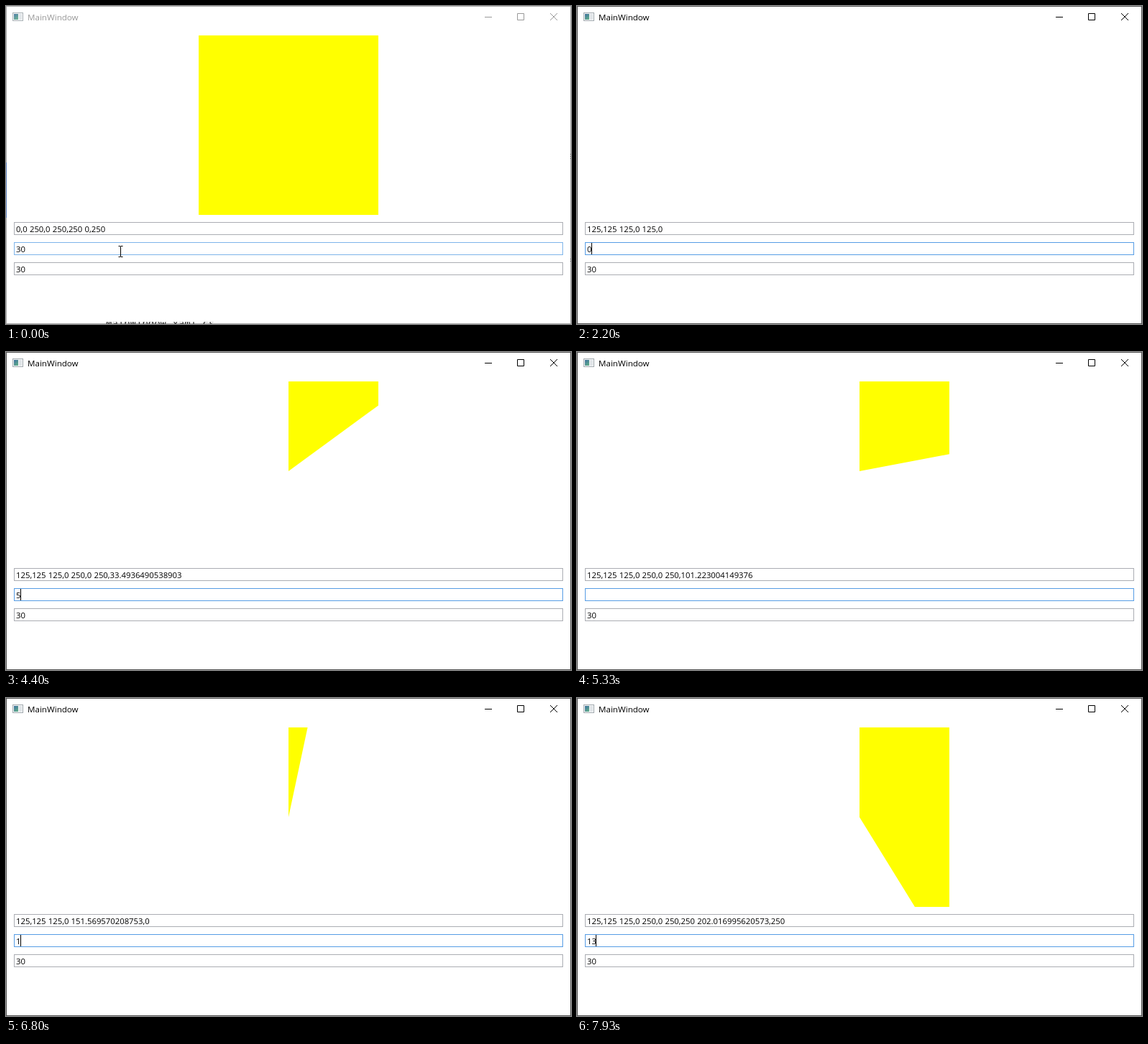
Write an HTML page that moves like this. It is 786 px wide and 443 px high and loops after 8 s.

```html
<!DOCTYPE html>
<html lang="en">
<head>
<meta charset="utf-8">
<title>MainWindow</title>
<style>
  html, body { margin: 0; width: 100%; height: 100%; overflow: hidden; background: #fff; }
  svg { display: block; width: 786px; height: 443px; }
  text { font-family: "Open Sans", "Noto Sans", sans-serif; font-size: 11.3px; word-spacing: .3px; white-space: pre; }
  .line { fill: none; stroke-width: 1; }
</style>
</head>
<body>
<svg viewBox="0 0 786 443" xmlns="http://www.w3.org/2000/svg">
  <defs>
    <linearGradient id="pane" x2="0.6" y2="1">
      <stop offset="0" stop-color="#3d6f9e"/>
      <stop offset="1" stop-color="#5fa98c"/>
    </linearGradient>
    <clipPath id="bottomEdge"><rect x="130" y="440" width="180" height="3"/></clipPath>
  </defs>
  <rect width="786" height="443" fill="#fff"/>

  <g id="icon">
    <rect x="9.5" y="9.5" width="14" height="11" fill="#f4f6f7" stroke="#a3abb0"/>
    <rect x="11" y="11" width="6" height="8" fill="url(#pane)"/>
    <rect x="18" y="11" width="4" height="8" fill="#dfe4e7"/>
  </g>
  <text id="title" x="30" y="20" style="font-size:11.6px">MainWindow</text>
  <path id="buttons" class="line" d="M666 15.5h10M711.5 10.5h9v9h-9zM757 10l10 10M767 10l-10 10"/>

  <polygon id="shape" transform="translate(268 41)" fill="#ff0"/>

  <g class="line" stroke="#abadb3">
    <rect x="11.5" y="301.5" width="763" height="17"/>
    <rect id="field" x="11.5" y="329.5" width="763" height="17"/>
    <rect x="11.5" y="357.5" width="763" height="17"/>
  </g>
  <text id="points" x="14" y="315"></text>
  <text id="value" x="14" y="343"></text>
  <text x="14" y="371">30</text>
  <rect id="selection" y="330" height="16" fill="#0078d7" fill-opacity=".42"/>
  <rect id="caret" y="330" width="1" height="16"/>

  <rect id="frame" class="line" x=".5" y=".5" width="785" height="442"/>
  <g id="behind">
    <path class="line" stroke="#5f82c0" d="M.5 218v77"/>
    <path class="line" stroke="#555" stroke-dasharray="1 2" d="M785.5 206v7M785.5 352v6"/>
    <text x="139" y="447" clip-path="url(#bottomEdge)" fill="#333"
      style="font:14px 'Noto Sans Mono',monospace">MainWindow.xaml.cs</text>
  </g>
  <path id="mouse" class="line" stroke="#000" d="M-3 -7.5h2.5l.5 .5l.5 -.5h2.5M0 -7v14M-3 7.5h2.5l.5 -.5l.5 .5h2.5"/>
</svg>
<script>
const LOOP = 8000, HALF = 125, MAX = 30, DIGIT = 6.47;
const ACTIVATE = 70, TICK = 66.4, DRAG_TICKS = 11;

// time, typed text, and whether the caret shows up a moment late
const edits = [
  [0, '30'], [2200, '0'],
  [2800, '', 1], [2930, '1'], [3330, '', 1], [3400, '2'],
  [3670, '', 1], [3730, '3'], [4000, '', 1], [4070, '4'],
  [4330, '', 1], [4400, '5'], [4670, ''], [4800, '6'],
  [5000, '', 1], [5130, '7'], [5330, '', 1], [5470, '8'],
  [5670, '', 1], [5730, '9'], [6070, '', 1],
  [6330, '1'], [6470, '10'], [6800, '1'], [7070, '11', 1],
  [7330, '1'], [7530, '12'], [7730, '1'], [7870, '13', 1]
];

const el = {};
document.querySelectorAll('svg [id]').forEach(n => el[n.id] = n);
const set = (name, attrs) => {
  for (const key in attrs) el[name].setAttribute(key, attrs[key]);
};
const show = (name, on) => set(name, { visibility: on ? 'visible' : 'hidden' });
const num = x => String(+x.toPrecision(15));

// Clockwise sweep along the square's edge, measured within each 45 degree part
function sector(value) {
  if (value >= MAX) return '0,0 250,0 250,250 0,250';
  const angle = value / MAX * 360;
  const part = Math.floor(angle / 45);
  const d = HALF * Math.tan((angle - part * 45) * Math.PI / 180);
  const pts = [[HALF, HALF], [HALF, 0]];
  if (part >= 1) pts.push([250, 0]);
  if (part >= 3) pts.push([250, 250]);
  pts.push([[HALF + d, 0], [250, d], [250, HALF + d], [250 - d, 250]][part]);
  return pts.map(p => p.map(num).join(',')).join(' ');
}

function draw(t) {
  const active = t >= ACTIVATE;
  const ink = active ? '#000' : '#999';
  set('title', { fill: ink });
  set('buttons', { stroke: ink });
  set('frame', { stroke: active ? '#555' : '#aaa' });
  set('field', { stroke: active ? '#569de5' : '#7eb4ea' });
  set('icon', { opacity: active ? 1 : .9 });
  show('behind', !active);

  let text = '', value = MAX, edit;
  for (const e of edits) {
    if (e[0] > t) break;
    edit = e;
    text = e[1];
    if (text) value = +text;
  }
  const points = sector(value);
  set('shape', { points });
  el.points.textContent = points;
  el.value.textContent = text;

  // Dragging left over the number and out of the window selects it
  const step = active ? Math.min(DRAG_TICKS, Math.floor((t - ACTIVATE) / TICK + .01)) : 0;
  const x = 159 - 169 * step / DRAG_TICKS;
  const typing = t >= edits[1][0];
  const picked = typing ? 0 : x < 17 ? 2 : x < 24 ? 1 : 0;
  set('mouse', { transform: `translate(${Math.round(x) + .5} 342)` });
  show('mouse', step < DRAG_TICKS);
  set('selection', { x: 27 - picked * 6.5, width: picked * 6.5 });

  const late = edit[2] && t - edit[0] < 55;
  set('caret', { x: Math.floor(14 + text.length * DIGIT) });
  show('caret', active && !picked && !late);
}

const start = performance.now();
function tick() {
  draw((performance.now() - start) % LOOP);
  requestAnimationFrame(tick);
}
draw(0);
requestAnimationFrame(tick);
</script>
</body>
</html>
```
